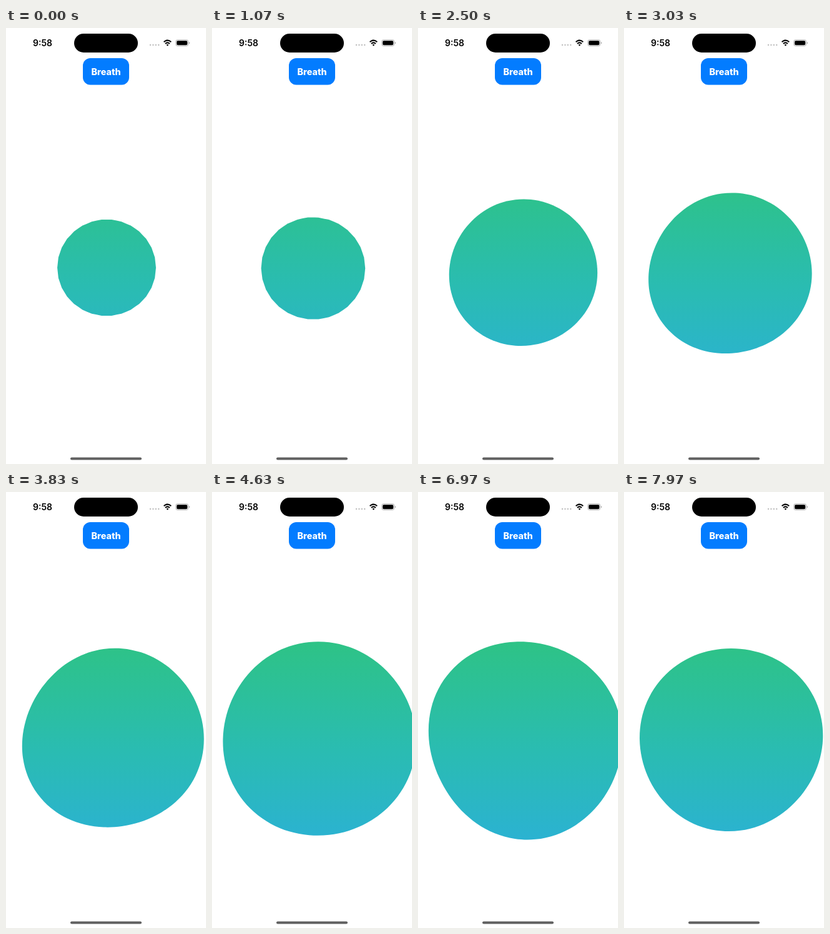
These frames come from a looping animation (320x694 px, 8 s). An HTML page:

```html
<!DOCTYPE html>
<html lang="en">
<head>
<meta charset="utf-8">
<title>Breath</title>
<style>
  html, body { margin: 0; width: 100%; height: 100%; overflow: hidden; background: #fff; }
  svg { display: block; width: 100vw; height: 100vh; }
  text { font-family: Inter, "Open Sans", sans-serif; }
</style>
</head>
<body>
<svg viewBox="0 0 320 694">
  <defs>
    <linearGradient id="water" gradientUnits="userSpaceOnUse" x1="0" y1="232" x2="0" y2="556">
      <stop offset="0" stop-color="#2ec384"/>
      <stop offset=".55" stop-color="#2abcb1"/>
      <stop offset="1" stop-color="#2bb2d2"/>
    </linearGradient>
  </defs>

  <path id="blob" fill="url(#water)"/>

  <g id="button">
    <rect x="123" y="48" width="74" height="42.5" rx="12" fill="#037cff"/>
    <text x="160" y="74.5" font-size="14.4" font-weight="800" fill="#fff" text-anchor="middle">Breath</text>
  </g>

  <text x="43" y="29" font-size="14" font-weight="600">9:58</text>
  <rect x="109" y="9" width="102" height="30" rx="15"/>
  <path d="M231 27h13.5" stroke="#c3c3c3" stroke-width="2.6" stroke-linecap="round" stroke-dasharray="0 4.4"/>
  <g fill="none" stroke="#000" stroke-width="2">
    <path d="M252.6 22.2q5.8-5.2 11.6 0"/>
    <path d="M254.9 24.9q3.5-3 7 0"/>
  </g>
  <path d="M256.5 26.8q1.9-1.6 3.8 0l-1.9 2z"/>
  <rect x="271.6" y="18.8" width="20" height="9.8" rx="3" fill="none" stroke="#a5a5a5" stroke-width=".9"/>
  <rect x="273" y="20.2" width="17.2" height="7" rx="1.9"/>
  <path d="M292.9 22v3.4q1.3-.5 1.3-1.7t-1.3-1.7" fill="#a5a5a5"/>
  <rect x="103" y="683.4" width="114" height="4" rx="2" fill="#606060"/>
</svg>

<script>
const DURATION = 8, POINTS = 30, TAU = 2 * Math.PI;
const INHALE = 0.9, HOLD = 5.97, EXHALE = 6.43;   // seconds
const SMALL = 77.9, LARGE = 161.5;                // mean radii

const byId = id => document.getElementById(id);
const clamp = v => Math.max(0, Math.min(1, v));
const easeOut = v => Math.sin(clamp(v) * TAU / 4);

// 0 at rest, 1 with the lungs full
function breathAt(t) {
  if (t > EXHALE) return 1 - 0.12 * (t - EXHALE);
  return easeOut((t - INHALE) / (HOLD - INHALE));
}

// The circle swells while two standing waves, of 2 and 3 lobes, bend its rim
function outline(t) {
  const breath = breathAt(t), drift = easeOut(breath);
  const clock = Math.min(t - HOLD, 0) + Math.max(t - EXHALE, 0);
  const radius = SMALL + (LARGE - SMALL) * breath;
  const cx = 161 + 10.5 * drift, cy = 381.5 + 12.2 * drift;
  const squash = 0.0135 * (1 - drift);
  const twoLobes = -0.027 * drift * Math.cos(TAU * clock / 5.2);
  const threeLobes = -0.015 * drift * Math.cos(TAU * (clock + 2.4) / 6.2);

  return Array.from({ length: POINTS }, (_, i) => {
    const angle = i / POINTS * TAU;
    const r = radius * (1
      + squash * Math.cos(2 * angle)
      + twoLobes * Math.cos(2 * angle - 1.13)
      + threeLobes * Math.sin(3 * angle)
      + 0.004 * drift * Math.cos(3 * angle));
    return [cx + r * Math.cos(angle), cy - r * Math.sin(angle)];
  });
}

// roundness 0 gives straight sides, 1 a smooth spline
function curve(points, roundness) {
  const at = i => points[(i + POINTS) % POINTS];
  const pair = (x, y) => x.toFixed(2) + "," + y.toFixed(2);
  const handle = (i, end) => {
    const p = at(i), q = at(i + end), before = at(i - 1), after = at(i + 1);
    const along = k => {
      const straight = (q[k] - p[k]) / 3, smooth = end * (after[k] - before[k]) / 6;
      return p[k] + straight + (smooth - straight) * roundness;
    };
    return pair(along(0), along(1));
  };
  return "M" + pair(...points[0]) + points.map((_, i) =>
    `C${handle(i, 1)} ${handle(i + 1, -1)} ${pair(...at(i + 1))}`).join("") + "Z";
}

function draw(t) {
  byId("blob").setAttribute("d", curve(outline(t), clamp(2 * breathAt(t))));
  const press = clamp((t - 0.5) / 0.06) * clamp((0.9 - t) / 0.3);
  byId("button").setAttribute("opacity", 1 - 0.4 * press);
}

const start = performance.now();
function frame() {
  draw((performance.now() - start) / 1000 % DURATION);
  requestAnimationFrame(frame);
}
frame();
</script>
</body>
</html>
```
